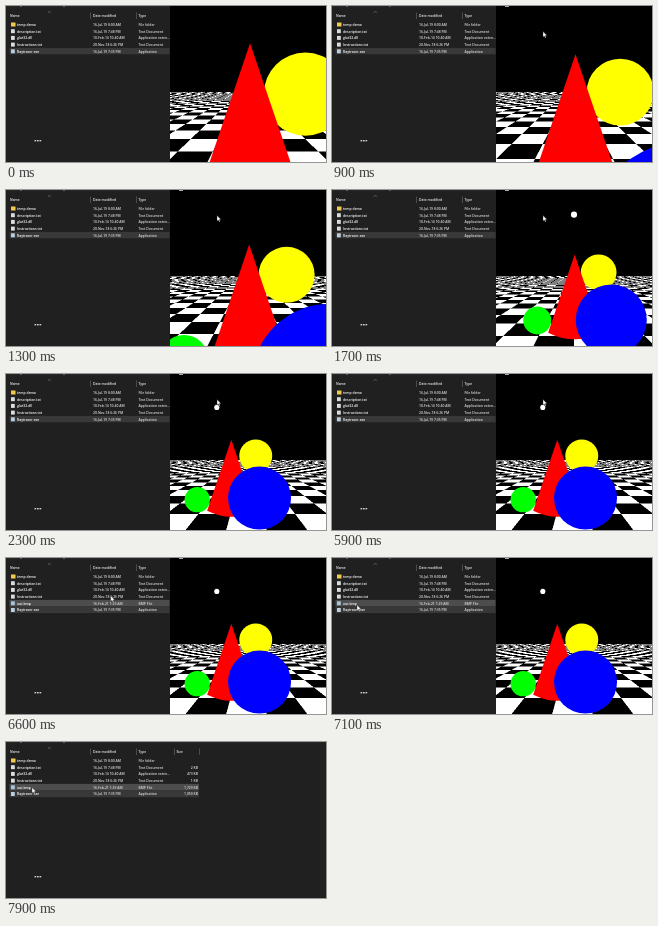
These frames come from a looping animation (320 by 156 pixels, 8000 ms). An HTML page with a canvas:

```html
<!DOCTYPE html>
<html>
<head>
<meta charset="utf-8">
<style>
html, body { margin: 0; width: 100%; height: 100%; overflow: hidden; background: #202020; }
canvas, svg { position: absolute; top: 0; left: 0; }
canvas { left: 164px; width: 156px; height: 156px; }
text { font: 600 3.4px "Open Sans", "Noto Sans", sans-serif; }
</style>
</head>
<body>
<canvas id="floor" width="312" height="312"></canvas>
<svg width="320" height="156" viewBox="0 0 320 156">
  <defs>
    <clipPath id="view"><rect x="164" width="156" height="156"/></clipPath>
  </defs>
  <rect id="panel" width="164" height="156" fill="#202020"/>
  <g id="list"></g>
  <g id="scene" clip-path="url(#view)">
    <circle id="yellow" fill="#ff0"/>
    <path id="cone" fill="#f00"/>
    <circle id="green" fill="#0f0"/>
    <circle id="blue" fill="#00f"/>
    <circle id="lamp" fill="#fff"/>
    <rect id="tab" x="173" width="4" height="1" fill="#aaa"/>
  </g>
  <g fill="#ccc">
    <rect x="28.5" y="134" width="1.7" height="1.4"/>
    <rect x="31" y="134" width="1.7" height="1.4"/>
    <rect x="33.5" y="134" width="1.7" height="1.4"/>
  </g>
  <path id="cursor" d="M0 0V5.6L1.3 4.5L2.2 6.5L3.1 6.1L2.3 4.1H4Z" fill="#fff" stroke="#222" stroke-width=".35"/>
</svg>
<script>
const $ = id => document.getElementById(id);
const LOOP = 8000, STEP = 100;
const FOCAL = 156, CX = 242, CY = 78, TILE = 0.52, HORIZON = 86;
const LIST_CHANGE = 6500, CLOSE = 7500;

// Depths are relative to the cone; the camera is 1 above the floor.
const balls = {
  yellow: { x: 0.425, y: 0.075, z: 0.4, r: 0.308 },
  green: { x: -0.54, y: 0.77, z: 0, r: 0.205 },
  blue: { x: 0.43, y: 0.6, z: -0.49, r: 0.41 },
  lamp: { x: 0, y: -0.4, z: -1.12, r: 0.023 }
};
const cone = { x: 0.01, top: -0.198, foot: 0.95, r: 0.39 };

const folder = "#f2c94c", page = "#dcdcdc";
const files = [
  ["temp demo", "16-Jul-19 8:00 AM", "File folder", "", folder],
  ["description.txt", "16-Jul-19 7:48 PM", "Text Document", "2 KB", page],
  ["glut32.dll", "10-Feb-14 10:40 AM", "Application exten...", "473 KB", page],
  ["Instructions.txt", "20-Nov-18 6:26 PM", "Text Document", "1 KB", page]
];
const program = ["Raytracer.exe", "16-Jul-19 7:35 PM", "Application", "1,050 KB", "#b9cfe0"];
const picture = ["out.bmp", "16-Feb-21 1:29 AM", "BMP File", "1,729 KB", "#a9c4d8"];

function track(points, t) {
  const i = points.findIndex(p => p[0] > t);
  if (i < 0) return points[points.length - 1][1];
  if (i === 0) return points[0][1];
  const [t0, a] = points[i - 1], [t1, b] = points[i];
  return a + (b - a) * (t - t0) / (t1 - t0);
}

const label = (x, y, s, fill, anchor = "start") =>
  `<text x="${x}" y="${y}" fill="${fill}" text-anchor="${anchor}">${s}</text>`;
const box = (x, y, w, h, fill) =>
  `<rect x="${x}" y="${y}" width="${w}" height="${h}" fill="${fill}"/>`;

function drawList(hasPicture, wide) {
  const rows = hasPicture ? [...files, picture, program] : [...files, program];
  const edge = wide ? 193 : 163.5;
  const columns = [[84.5, 87, "Date modified"], [130.3, 132.5, "Type"]];
  if (wide) columns.push([168, 170.5, "Size"]);
  let out = box(0, 0, wide ? 320 : 164, 0.6, "#2c2c2c") +
    box(14, 0, 2, 0.7, "#777") + box(57, 0, 2, 0.7, "#777") +
    '<path d="M41.8 6.6L43.3 5.4L44.8 6.6" fill="none" stroke="#999" stroke-width=".5"/>' +
    label(4, 11, "Name", "#eee");
  for (const [line, x, title] of columns)
    out += box(line, 6.5, 0.5, 6.5, "#777") + label(x, 11, title, "#eee");
  if (wide) out += box(193, 6.5, 0.5, 6.5, "#777");
  rows.forEach((row, i) => {
    const [name, date, type, size, color] = row;
    const y = 18.5 + i * 6.7;
    const shade = row === picture ? "#4d4d4d" : "#383838";
    if (row === picture || row === program) out += box(3.5, y - 3.4, edge - 3.5, 6.6, shade);
    out += box(5, y - 2, color === folder ? 4.5 : 3.8, 4, color);
    out += label(11, y + 1.3, name, "#fff") + label(87, y + 1.3, date, "#ddd") + label(132.5, y + 1.3, type, "#ddd");
    if (wide) out += label(192, y + 1.3, size, "#ddd", "end");
  });
  // Long type names run on under the neighbouring window.
  $("list").innerHTML = out;
  $("list").setAttribute("clip-path", wide ? "none" : "inset(0)");
}

const ctx = $("floor").getContext("2d");
const image = ctx.createImageData(312, 312);
const pixels = new Uint32Array(image.data.buffer);
const BLACK = 0xff000000, WHITE = 0xffffffff;

function drawFloor(camX, dist) {
  pixels.fill(BLACK);
  for (let j = HORIZON * 2; j < 312; j++) {
    const z = FOCAL / ((j + 0.5) / 2 - CY);
    const row = Math.floor((z - dist) / TILE);
    for (let i = 0; i < 312; i++) {
      const x = ((i + 0.5) / 2 - 78) * z / FOCAL + camX;
      if ((Math.floor(x / TILE) + row) & 1) pixels[j * 312 + i] = WHITE;
    }
  }
  ctx.putImageData(image, 0, 0);
}

function drawScene(camX, dist) {
  drawFloor(camX, dist);
  for (const [id, b] of Object.entries(balls)) {
    const z = dist + b.z, k = FOCAL / z, el = $(id);
    el.setAttribute("visibility", z > 0.05 ? "inherit" : "hidden");
    if (z <= 0.05) continue;
    el.setAttribute("cx", CX + (b.x - camX) * k);
    el.setAttribute("cy", CY + b.y * k);
    el.setAttribute("r", b.r * k);
  }
  const k = FOCAL / dist, x = CX + (cone.x - camX) * k, w = cone.r * k;
  const foot = CY + cone.foot * k;
  $("cone").setAttribute("d",
    `M${x} ${CY + cone.top * k}L${x - w} ${foot}Q${x} ${foot + 0.5 * w} ${x + w} ${foot}Z`);
}

let listState = "", sceneState = "";

function render(time) {
  const t = Math.floor(time % LOOP / STEP) * STEP;
  const closed = t >= CLOSE, changed = t >= LIST_CHANGE;

  const dist = track([[500, 0.756], [1300, 1.316], [1700, 2.29], [1900, 2.52]], t);
  const camX = track([[1700, 0], [2000, 0.28]], t);
  if (sceneState !== dist + "/" + camX) {
    sceneState = dist + "/" + camX;
    drawScene(camX, dist);
  }
  $("scene").style.visibility = closed ? "hidden" : "visible";
  $("tab").setAttribute("visibility", t >= 300 ? "inherit" : "hidden");
  $("panel").setAttribute("width", closed ? 320 : 164);

  if (listState !== changed + "/" + closed) {
    listState = changed + "/" + closed;
    drawList(changed, closed);
  }

  const mx = track([[6200, 211], [6900, 25], [7300, 25], [7600, 26]], t);
  const my = track([[6200, 25.5], [6900, 47], [7300, 47], [7600, 45.5]], t);
  $("cursor").setAttribute("transform", `translate(${mx} ${my})`);
  $("cursor").setAttribute("visibility", t >= 300 ? "visible" : "hidden");
}

const start = performance.now();
function tick() {
  render(performance.now() - start);
  requestAnimationFrame(tick);
}
tick();
</script>
</body>
</html>
```
